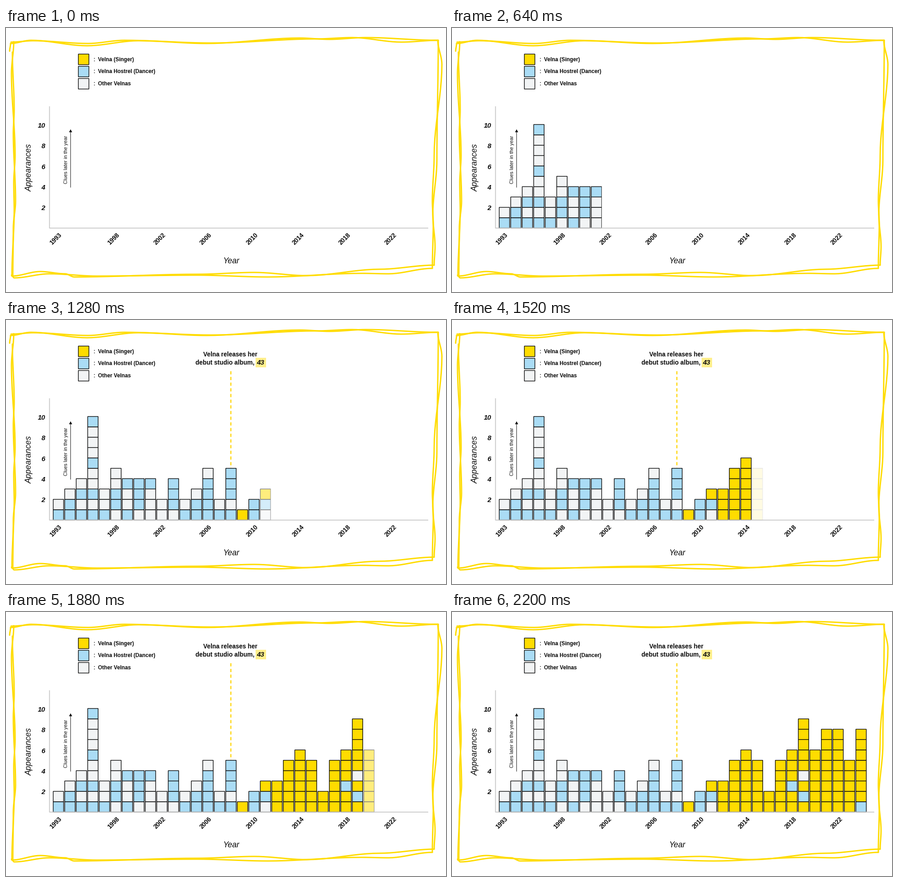
Recreate the animation shown at these times as a matplotlib script. Size 966x580 px, loop 2480 ms.

```python
import numpy as np
import matplotlib.pyplot as plt
from matplotlib.animation import FuncAnimation
from matplotlib.colors import to_rgb
from matplotlib.patches import Polygon, Rectangle

W, H, DPI = 966, 580, 100
PX = 72 / DPI                      # points per pixel
FRAMES, INTERVAL = 62, 40

YELLOW, BLUE, PALE, INK = "#ffdc00", "#aadcf5", "#f2f4f5", "#0a0a0a"
FILL = {"y": YELLOW, "b": BLUE, "w": PALE}

# One stack per year, listed from the bottom up
FIRST = 1993
STACKS = ("bw bbw bwbw bwbwwbwwwb bww wbbww bwwb wbbb wwwb ww wbbb bw bbw "
          "bbbbw bw bwbbb y bb wby yyy yyyyy yyyyyy yyyyy yy yyyyy yybyyy "
          "ybywyyyyy yyyyyy yyyyyyyy yyyyyyyy yyyyy byyyyyyy").split()
X0, PITCH, CELL_W = 103.6, 25.26, 22.9
BASE, CELL_H = 439.5, 22.75

COLUMNS_PER_FRAME = 0.6
HOLD_AT, HOLD = 15, 1.15           # the build rests briefly after 2001

fig = plt.figure(figsize=(W / DPI, H / DPI), dpi=DPI, facecolor="white")
ax = fig.add_axes([0, 0, 1, 1])
ax.set_xlim(0, W)
ax.set_ylim(H, 0)
ax.axis("off")
plt.rcParams["font.family"] = "Liberation Sans"


def text(x, y, s, size, **kw):
    kw = {"va": "baseline", "color": INK, **kw}
    return ax.text(x, y, s, fontsize=size * PX, **kw)


def line(xs, ys, color, width, **kw):
    kw = {"solid_capstyle": "butt", **kw}
    return ax.plot(xs, ys, color=color, lw=width * PX, **kw)[0]


def box(x, y, w, h, fill):
    return ax.add_patch(Rectangle((x, y), w, h, facecolor=fill, edgecolor=INK,
                                  lw=1.4 * PX, snap=False))


def fade(color, a):
    """Blend a colour with the white page."""
    return tuple(1 - a * (1 - np.array(to_rgb(color))))


def stroke(*turns, upright=False):
    """Pen stroke that eases sideways from one turning point to the next."""
    t = np.linspace(0, 1, 12)
    ease = t * t * (3 - 2 * t)
    path = []
    for (u0, v0), (u1, v1) in zip(turns, turns[1:]):
        path.append((u0 + (u1 - u0) * t, v0 + (v1 - v0) * ease))
    u, v = np.hstack(path)
    line(*((v, u) if upright else (u, v)), YELLOW, 3,
         solid_capstyle="round", solid_joinstyle="round")


def draw_border():
    # Two strokes per side; upright ones take (y, x)
    stroke((10, 34), (55, 27), (178, 39), (290, 28), (440, 34), (645, 22),
           (710, 25), (790, 21), (948, 27))
    stroke((11, 31), (60, 28), (180, 34), (260, 27), (450, 33), (680, 24),
           (760, 21), (868, 31), (949, 27))
    stroke((51, 8), (34, 10), upright=True)
    stroke((27, 948), (80, 957), (280, 940), (380, 936), (430, 938),
           (528, 936), upright=True)
    stroke((27, 949), (290, 946), (410, 937), (480, 942), (521, 940),
           upright=True)
    stroke((30, 17), (100, 12), (280, 20), (340, 17), (400, 18), (545, 13),
           upright=True)
    stroke((53, 14), (180, 18), (230, 16), (380, 21), (440, 16), (545, 15),
           upright=True)
    stroke((13, 545), (75, 535), (130, 540), (150, 547), (420, 541),
           (545, 537), (660, 544), (820, 530), (940, 521))
    stroke((12, 543), (18, 549), (95, 540), (200, 545), (420, 543),
           (575, 547), (780, 539), (840, 540), (936, 528))


def draw_legend():
    rows = [(YELLOW, "Velna (Singer)"), (BLUE, "Velna Hostrel (Dancer)"),
            (PALE, "Other Velnas")]
    for k, (color, label) in enumerate(rows):
        y = 57.3 + 26.8 * k
        box(158.8, y, 23.2, 23.2, color)
        text(192, y + 15.3, ":", 13, weight="bold")
        text(201.5, y + 15.3, label, 11.8, weight="bold")


def draw_axes():
    line([95.5, 95.5, 927], [172, 439.6, 439.6], "#c6c6c6", 1.8, zorder=5,
         snap=False)
    for n in range(2, 11, 2):
        text(86, 400.3 - 22.7 * (n - 2), n, 15, ha="right", weight="bold",
             style="italic")
    for year in (FIRST, *range(1998, 2023, 4)):
        text(109 + 25.36 * (year - FIRST), 463.3, year, 13.7, ha="center",
             va="center", rotation=45, weight="bold")
    text(494.5, 517, "Year", 17.6, ha="center", style="italic")
    upright = dict(ha="center", rotation=90, rotation_mode="anchor")
    text(55.6, 306.5, "Appearances", 17.8, style="italic", **upright)
    text(134.8, 289.5, "Clues later in the year", 10.8, **upright)
    line([141.8, 141.8], [350.5, 228], INK, 1, snap=False)
    ax.add_patch(Polygon([(141.8, 222.5), (138.4, 229), (145.2, 229)],
                         facecolor=INK, lw=0))


def draw_note():
    return [
        ax.add_patch(Rectangle((548, 83), 22.5, 20.5, facecolor="#ffef8c", lw=0)),
        text(492, 80, "Velna releases her", 13.6, ha="center", weight="bold"),
        text(416.5, 97.7, "debut studio album,", 13.6, weight="bold"),
        text(559, 98, "43", 15, ha="center", weight="bold", style="italic"),
        line([493.7, 493.7], [112.5, 325], "#ffd91a", 2.6, dashes=(2.7, 2.1),
             dash_capstyle="butt", snap=False),
    ]


def left(i):
    return X0 + PITCH * i


def columns_shown(frame):
    moving = min(frame, HOLD_AT) + max(frame - HOLD_AT - HOLD, 0)
    return COLUMNS_PER_FRAME * moving


draw_border()
draw_legend()
draw_axes()
note = draw_note()
columns = [[(box(left(i), BASE - CELL_H * (n + 1), CELL_W, CELL_H, FILL[c]),
             FILL[c]) for n, c in enumerate(stack)]
           for i, stack in enumerate(STACKS)]
# The newest column has its right outline trimmed
trim = ax.add_patch(Rectangle((0, 180), 2, 259, facecolor="white", lw=0,
                              zorder=4, snap=False))


def update(frame):
    shown = columns_shown(frame)
    opacity = np.clip(shown - np.arange(len(columns)), 0, 1)
    for a, cells in zip(opacity, columns):
        for cell, color in cells:
            cell.set_visible(a > 0)
            cell.set_facecolor(fade(color, a))
            cell.set_edgecolor(fade(INK, a))
    newest = np.count_nonzero(opacity) - 1
    trim.set_visible(0 <= newest < len(columns) - 1)
    trim.set_x(left(newest) + CELL_W + 0.2)
    for part in note:
        part.set_alpha(float(opacity[2008 - FIRST]))
    return []


anim = FuncAnimation(fig, update, frames=FRAMES, interval=INTERVAL,
                     init_func=lambda: update(0), repeat=True, repeat_delay=0,
                     blit=False)
plt.show()
```
